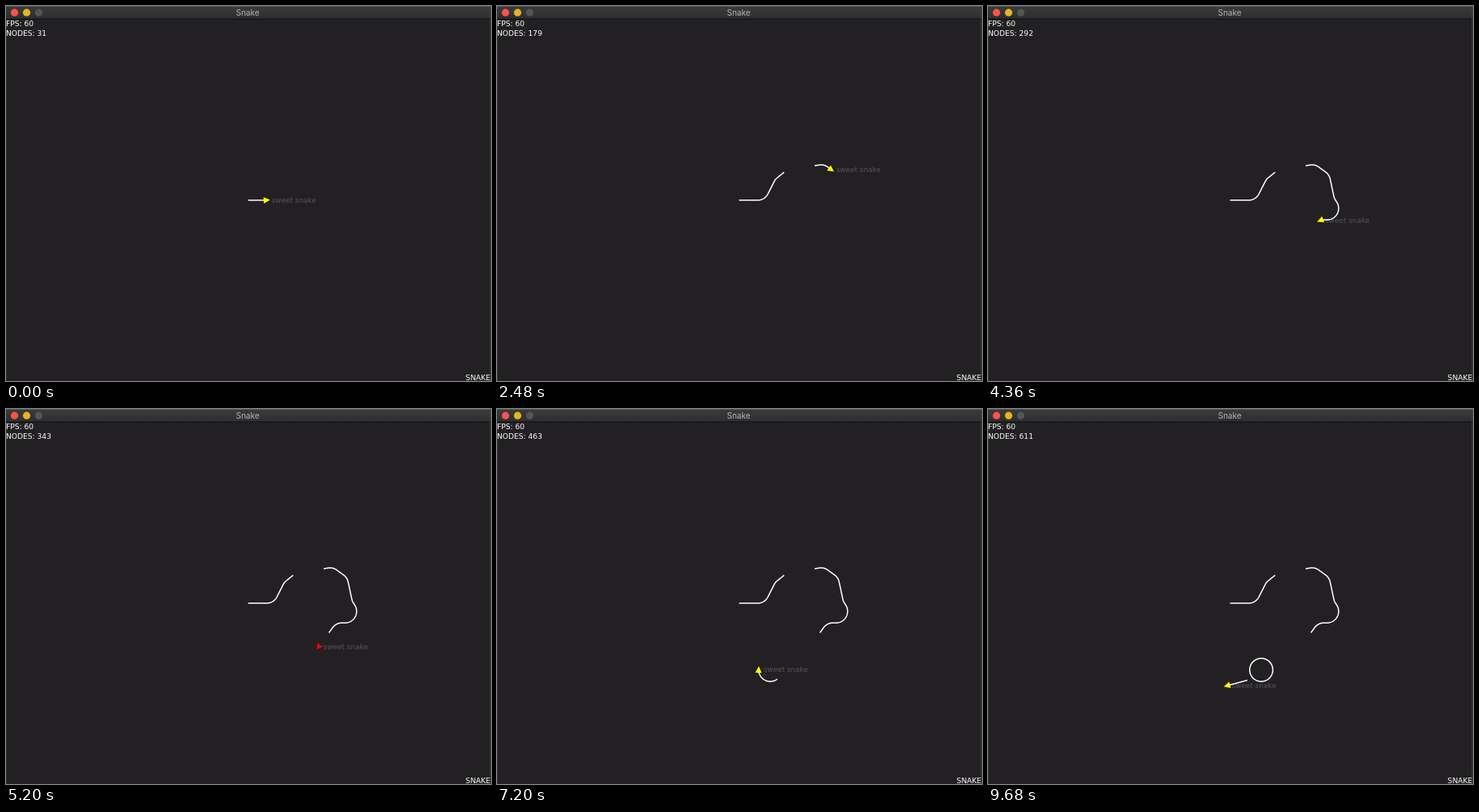
Write an HTML page with a canvas that moves like this. It is 600 by 465 pixels and loops after 9.72 s.

```html
<!DOCTYPE html>
<html lang="en">
<head>
<meta charset="utf-8">
<title>Snake</title>
<style>
  html, body { margin: 0; width: 100%; height: 100%; overflow: hidden; background: #222022; }
  canvas { display: block; }
</style>
</head>
<body>
<canvas id="stage" width="600" height="465"></canvas>
<script>
const ctx = document.getElementById('stage').getContext('2d');
const LOOP = 9720, TICK = 40;
const STEP = 0.75, TURN = 3, START_NODES = 31, NODES_PER_SECOND = 60;
const RAD = Math.PI / 180;

// Key moments: from this node on, the snake steers to this heading in degrees
const goals = new Map([
  [30, -63], [74, -39], [97, -9], [156, 36], [185, 78], [228, 57],
  [239, 180], [285, 126], [343, 147], [383, 117], [411, 561], [561, 525]
]);
// Nodes where the trail is switched off and on again
const switches = [97, 148, 314, 419, 545, 575];
const isVisible = node => switches.filter(s => s < node).length % 2 === 0;

function buildPath(count) {
  const path = [];
  let x = 299.5, y = 240.8, heading = 0, goal = 0;
  for (let i = 0; i <= count; i++) {
    path.push({ x, y, angle: heading * RAD, visible: isVisible(i) });
    goal = goals.get(i) ?? goal;
    x += STEP * Math.cos(heading * RAD);
    y += STEP * Math.sin(heading * RAD);
    heading += TURN * Math.sign(goal - heading);
  }
  return path;
}

const nodeCount = time => Math.floor(START_NODES + time * NODES_PER_SECOND / 1000);
const path = buildPath(nodeCount(LOOP));

function text(str, x, y, { color = '#fff', align = 'left', size = 9.15, family = '"DejaVu Sans"' } = {}) {
  ctx.font = `${size}px ${family}, sans-serif`;
  ctx.textAlign = align;
  ctx.fillStyle = color;
  ctx.fillText(str, x, y);
}

function rect(color, x, y, w, h) {
  ctx.fillStyle = color;
  ctx.fillRect(x, y, w, h);
}

function drawWindow() {
  rect('#222022', 0, 0, 600, 465);
  const bar = ctx.createLinearGradient(0, 0, 0, 16);
  bar.addColorStop(0, '#3a3b3d');
  bar.addColorStop(1, '#2d2e30');
  rect(bar, 0, 0, 600, 16);
  rect('#565758', 0, 0, 600, 1);
  rect('#111', 0, 15.5, 600, 1);
  rect('#454446', 0, 16, 0.6, 449);
  rect('#454446', 598.6, 1, 0.8, 464);
  ['#ff5148', '#e6b422', '#555556'].forEach((color, i) => {
    ctx.fillStyle = color;
    ctx.beginPath();
    ctx.arc(10.5 + 15 * i, 8.2, 4.6, 0, 7);
    ctx.fill();
  });
  text('Snake', 299, 11.8, { color: '#b5b5b6', align: 'center', size: 10, family: 'Inter' });
}

function drawTrail(count) {
  ctx.beginPath();
  path.slice(0, count + 1).forEach(({ x, y, visible }, i) => {
    if (visible && path[i - 1]?.visible) ctx.lineTo(x, y);
    else ctx.moveTo(x, y);
  });
  ctx.strokeStyle = '#fff';
  ctx.lineWidth = 1.5;
  ctx.stroke();
}

function drawHead({ x, y, angle, visible }) {
  ctx.save();
  ctx.translate(x, y);
  ctx.rotate(angle);
  ctx.beginPath();
  ctx.moveTo(4, 0);
  ctx.lineTo(-4, 4);
  if (!visible) ctx.lineTo(-2.6, 0);
  ctx.lineTo(-4, -4);
  ctx.fillStyle = visible ? '#ff0' : '#f00';
  ctx.fill();
  ctx.restore();
}

function draw(time) {
  const count = nodeCount(time);
  const head = path[count];
  drawWindow();
  text('FPS: 60', 0, 25.3);
  text('NODES: ' + count, 0, 36.7);
  text('SNAKE', 599.2, 464.4, { align: 'right' });
  text('sweet snake', head.x + 6, head.y + 3.3, { color: '#565557', size: 8.9 });
  drawTrail(count);
  drawHead(head);
}

let start;
function frame(now) {
  start ??= now;
  const time = (now - start) % LOOP;
  draw(Math.floor(time / TICK) * TICK);
  requestAnimationFrame(frame);
}
draw(0);
requestAnimationFrame(frame);
</script>
</body>
</html>
```
